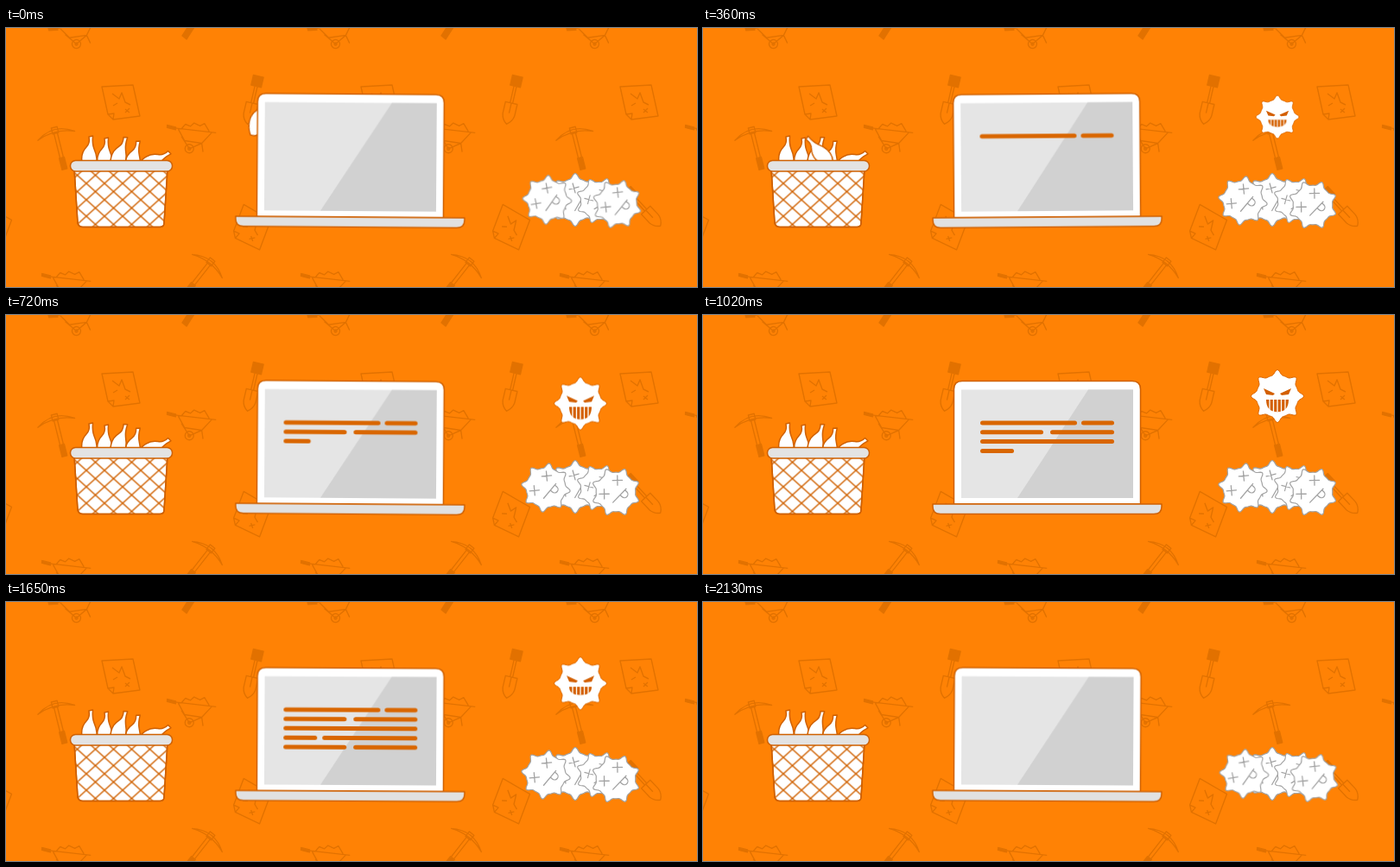
An HTML page that plays this animation: 800x300 px, repeating every 2160 ms.

```html
<!DOCTYPE html>
<html lang="en">
<head>
<meta charset="utf-8">
<title>Laptop, germs and bananas</title>
<style>
@property --p { syntax: "<number>"; inherits: true; initial-value: 0; }
html, body { margin: 0; width: 100%; height: 100%; overflow: hidden; background: #ff8205; }
svg { display: block; width: 800px; height: 300px; }

.tools { fill: none; stroke: #e27100; stroke-width: 1.4; stroke-linejoin: round; }
.solid { fill: #e27100; }
.ink { stroke: #cf6000; stroke-width: 1.5; stroke-linejoin: round; }
.bars { fill: none; stroke: #d96600; stroke-width: 5; stroke-linecap: round; }
.bars path {
  stroke-dasharray: var(--l) 400;
  stroke-dashoffset: calc((var(--l) - clamp(-4, (var(--p) - var(--a)) * 155, var(--l))) * 1px);
}
.dead { fill: #fff; stroke: #a3a3a3; stroke-width: 1.3; stroke-linecap: round; }

.loop { animation: 2160ms linear infinite; }
#laptop { transform-origin: 398px 200px; animation: sway 120ms ease-in-out infinite alternate; }
#bars { animation-name: type; }
#banana { animation-name: toss; }
#basket { transform-origin: 133px 231px; animation-name: catch; }
#germ { animation-name: hover; animation-timing-function: cubic-bezier(.37, 0, .63, 1); }
#mouth { transform-origin: 0 4px; animation: laugh 140ms ease-in-out -400ms infinite alternate; }
#beam { transform-origin: 508px 161px; animation-name: beam; }
.jolt { animation-name: jolt; }

@keyframes sway { from { transform: rotate(.4deg); } to { transform: rotate(-.4deg); } }
@keyframes laugh { from { transform: scaleY(1.03); } to { transform: scaleY(.55); } }
@keyframes type {
  0%, 3.3% { --p: 0; }
  16.67% { --p: 1; }
  33.33% { --p: 2.17; }
  47.22% { --p: 3.26; }
  63.89% { --p: 4.48; }
  71%, 94.4% { --p: 5; }
  94.5%, 100% { --p: -.1; }
}
@keyframes toss {
  0% { transform: translate(291px, 105px) rotate(12deg); }
  4.17% { transform: translate(246px, 87px) rotate(-15deg); }
  8.33% { transform: translate(197px, 85px) rotate(-32deg); }
  12.5% { transform: translate(154px, 105px) rotate(-42deg); }
  16.67% { transform: translate(134px, 144px) rotate(-45deg); }
  23%, 97% { transform: translate(134px, 195px) rotate(-45deg); }
  97.1% { transform: translate(320px, 105px) rotate(12deg); }
  100% { transform: translate(291px, 105px) rotate(12deg); }
}
@keyframes catch {
  0%, 16.67% { transform: none; }
  19.44% { transform: scale(1.06, .95); }
  22.22% { transform: scale(.98, 1.02); }
  25%, 100% { transform: none; }
}
@keyframes hover {
  0%, 11% { transform: translate(665px, 106px) scale(0); }
  16.67% { transform: translate(665px, 103px) scale(.82); }
  20.8% { transform: translate(665px, 95px) scale(1); }
  33.33% { transform: translate(665px, 102.5px); }
  47.22% { transform: translate(665px, 94px); }
  61.11% { transform: translate(665px, 102.5px); }
  75% { transform: translate(665px, 94px); }
  87.5% { transform: translate(667px, 102.5px) scale(1); }
  94.44%, 100% { transform: translate(667px, 102.5px) scale(0); }
}
@keyframes beam {
  0%, 76.4% { transform: scale(0); }
  82%, 90.3% { transform: none; }
  96.5%, 100% { transform: scale(0); }
}
@keyframes jolt {
  0% { transform: translate(1.5px, -1px) rotate(-5deg); }
  11%, 92% { transform: none; }
  97%, 100% { transform: translate(1.5px, -1px) rotate(-5deg); }
}
</style>
</head>
<body>
<svg viewBox="0 0 800 300">
  <defs>
    <path id="spiky"/>
    <path id="fruit" d="M0-21L4.500-22C4-16 4-12 6-7 10 2 10 9 7 15 4 20 0 21-4 20-10 10-10-2-3-9 0-12 1-16 0-21Z"/>
    <path id="face" fill="none" d="M-15-12l8 8m0-8l-8 8M7-12l8 8m0-8l-8 8M-11 6H11M1 6v3a4 4 0 0 0 8 0v-3"/>
    <path id="tub" d="M79 163H187L183 226Q183 230.500 178 230.500H89Q84 230.500 83 226Z"/>

    <g id="shovel">
      <path class="solid" d="M-6-28H6V-16H-6Z"/>
      <path d="M-1.500-16V4M1.500-16V4M-7 4H7V18Q6 25 0 29-6 25-7 18ZM0 4v12"/>
    </g>
    <g id="pick">
      <path d="M-22 5Q0-10 22 5 0-4-22 5ZM-3.500-5h7v7h-7ZM-2 2V31M2 2V31"/>
      <path class="solid" d="M-3 31h6v14h-6Z"/>
    </g>
    <g id="barrow">
      <path class="solid" d="M-31-12l10 2v3l-10-2Z"/>
      <path d="M-22-9L26-6M21-6L10 7-10 5-18-8M-14-9l4-5 6 2 4-4 7 3 5-3 6 9M-14 0L-4 14M10 7l-14 7M10 7l2 10"/>
      <circle cx="-4" cy="14" r="5"/><circle cx="-4" cy="14" r="1.500"/>
    </g>
    <path id="paper" d="M-21-18L15-20 23 16-8 20-14 14ZM-14 14l7-1-1 7M-9-10l8 6 3-7 4 11 6 3M-8 4l5-3M6 8l5 4m0-5l-5 5"/>

    <pattern id="tile" width="300" height="300" patternUnits="userSpaceOnUse">
      <g class="tools">
        <use href="#barrow" transform="translate(82 4) rotate(-14)"/>
        <use href="#barrow" transform="translate(217 126) rotate(3)"/>
        <use href="#barrow" transform="translate(72 298) rotate(3)"/>
        <use href="#paper" transform="translate(132 86)"/>
        <use href="#paper" transform="translate(283 231) rotate(33)"/>
        <use href="#paper" transform="translate(-17 231) rotate(33)"/>
        <use href="#shovel" transform="translate(286 83) rotate(13)"/>
        <use href="#shovel" transform="translate(138 208) rotate(-43)"/>
        <use href="#pick" transform="translate(57 120) rotate(-14)"/>
        <use href="#pick" transform="translate(236 272) rotate(38)"/>
        <path class="solid" d="M213-5l5 4-9 14-5-4Z"/>
      </g>
    </pattern>
    <pattern id="weave" width="21" height="19" patternUnits="userSpaceOnUse" x="82.500" y="170.500">
      <path d="M-2.100-1.900L23.100 20.900M23.100-1.900L-2.100 20.900" stroke="#cf6000" stroke-width="1.400"/>
    </pattern>
    <linearGradient id="glow" gradientUnits="userSpaceOnUse" x1="672" y1="98" x2="713" y2="78">
      <stop stop-color="#fff" stop-opacity=".9"/><stop offset="1" stop-color="#fff" stop-opacity="0"/>
    </linearGradient>
    <linearGradient id="edge" gradientUnits="userSpaceOnUse" x1="672" y1="98" x2="713" y2="78">
      <stop stop-color="#d96600"/><stop offset="1" stop-color="#d96600" stop-opacity="0"/>
    </linearGradient>
  </defs>

  <rect width="800" height="300" fill="#ff8205"/>
  <rect width="800" height="300" fill="url(#tile)"/>

  <g id="germ" class="loop">
    <use href="#spiky" fill="#fff" stroke="#d96600"/>
    <path fill="#d35f00" d="M-16-9L-3-3-5-1-13-2ZM16-9L3-3 5-1 13-2Z"/>
    <g id="mouth">
      <path fill="#d35f00" d="M-13 4H13Q13 18 0 18-13 18-13 4Z"/>
      <path stroke="#fff" stroke-width="1.300" d="M-9 4v14m4.500-14v14M0 4v14m4.500-14v14M9 4v14"/>
    </g>
  </g>

  <g id="beam" class="loop">
    <path fill="url(#glow)" d="M500 149L693 37 738 130 500 180Z"/>
    <path fill="none" stroke="url(#edge)" stroke-width="4" d="M500 149L693 38M500 180L738 129"/>
  </g>

  <g class="dead">
    <g transform="translate(659 199)"><use href="#spiky"/><use href="#face" transform="rotate(-60)"/></g>
    <g transform="translate(687 200)"><use href="#spiky" transform="rotate(20) scale(.88)"/><use href="#face" transform="rotate(-30) scale(.9)"/></g>
    <g transform="translate(625 200)"><g class="loop jolt"><use href="#spiky" transform="rotate(8) scale(.93)"/><use href="#face" transform="rotate(-50)"/></g></g>
    <g transform="translate(706 205)"><g class="loop jolt"><use href="#spiky" transform="rotate(22) scale(.93)"/><use href="#face" transform="rotate(-46)"/></g></g>
  </g>

  <g class="ink" fill="#fff">
    <use href="#fruit" transform="translate(96 147)"/>
    <use href="#fruit" transform="translate(114 149)"/>
    <use href="#fruit" transform="translate(147 152) rotate(10)"/>
    <use href="#fruit" transform="translate(131 147) rotate(14)"/>
    <use href="#fruit" transform="translate(170 154) rotate(57)"/>
    <use id="banana" class="loop" href="#fruit"/>
  </g>

  <g id="basket" class="loop ink">
    <use href="#tub" fill="#fff"/>
    <use href="#tub" fill="url(#weave)"/>
    <rect x="74.500" y="153.500" width="118" height="12.500" rx="6" fill="#e3e3e3"/>
  </g>

  <g id="laptop">
    <path class="ink" fill="#fff" d="M290.500 219V86Q290.500 76.500 300 76.500H497Q506.500 76.500 506.500 86V219Z"/>
    <path fill="#e5e5e5" d="M299 86.500H498V212H299Z"/>
    <path fill="#d1d1d1" d="M446 86.500H498V212H364Z"/>
    <path class="ink" fill="#e1e1e1" d="M266 219H531V222Q531 230.500 522 230.500H275Q266 230.500 266 222Z"/>
    <g id="bars" class="bars loop"></g>
  </g>
</svg>
<script>
const $ = id => document.getElementById(id);
const LOOP = 2160, TICK = 30;

// Round body with eight narrow spikes
const outline = Array.from({ length: 160 }, (_, i) => {
  const a = i / 160 * 2 * Math.PI;
  const r = 24.5 + 6 * ((1 + Math.cos(8 * a)) / 2) ** 3;
  return (r * Math.cos(a)).toFixed(2) + " " + (r * Math.sin(a)).toFixed(2);
});
$("spiky").setAttribute("d", "M" + outline.join("L") + "Z");

// Text bars: [from, to] pairs for each row
const rows = [
  [[321, 433], [438, 476]],
  [[321, 394], [402, 476]],
  [[321, 476]],
  [[321, 360], [366, 476]],
  [[321, 394], [402, 476]]
];
rows.forEach((row, i) => row.forEach(([from, to]) => {
  const bar = document.createElementNS("http://www.w3.org/2000/svg", "path");
  bar.setAttribute("d", `M${from + 2.5} ${125 + i * 10.8}H${to - 2.5}`);
  bar.style.setProperty("--l", to - from - 5);
  bar.style.setProperty("--a", i + (from - 321) / 155);
  $("bars").append(bar);
}));

// One clock steps every animation
const moves = document.getAnimations();
moves.forEach(m => m.pause());
const start = performance.now();
function step() {
  const t = (performance.now() - start) % LOOP;
  const now = Math.floor(t / TICK) * TICK;
  moves.forEach(m => { m.currentTime = now; });
  requestAnimationFrame(step);
}
step();
</script>
</body>
</html>
```
